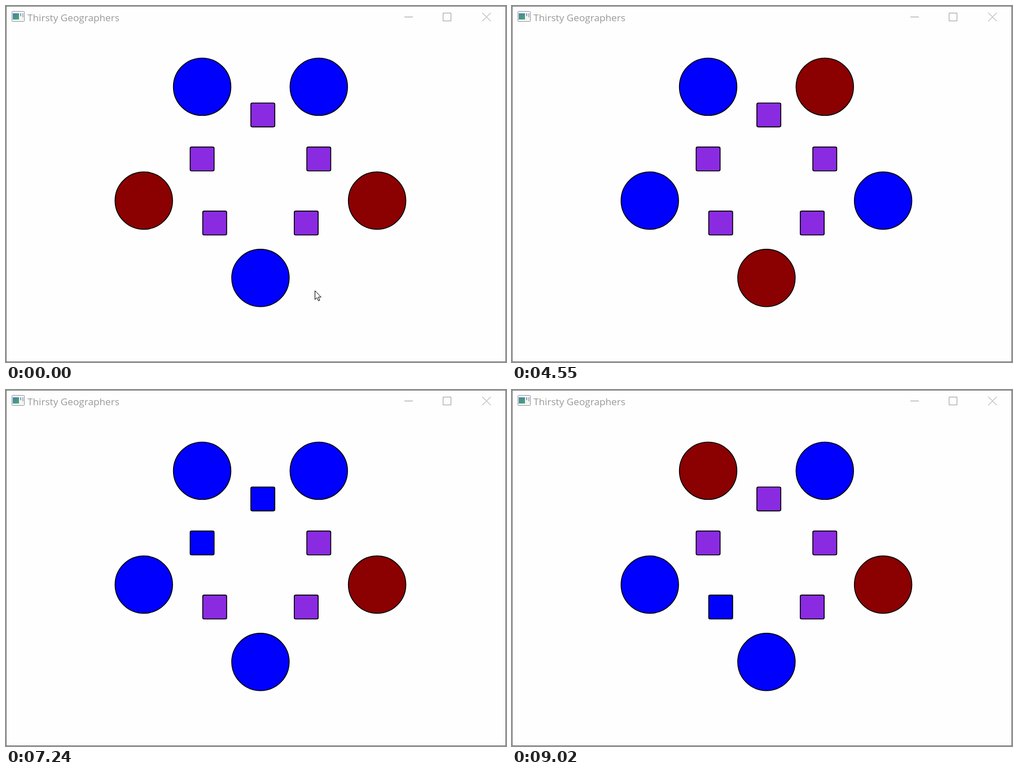
These frames come from a looping animation (886 px wide and 632 px high, 9.29 s). An HTML page:

```html
<!DOCTYPE html>
<html lang="en">
<head>
<meta charset="utf-8">
<title>Thirsty Geographers</title>
<style>
  html, body { margin: 0; width: 100%; height: 100%; overflow: hidden; background: #fefefe; }
  svg { display: block; }
  text { font: 17.2px "Open Sans", "Noto Sans", sans-serif; fill: #999; }
</style>
</head>
<body>
<svg width="886" height="632" viewBox="0 0 886 632">
  <rect x=".5" y=".5" width="885" height="631" fill="#fefefe" stroke="#6c6c6c"/>
  <!-- title bar -->
  <defs>
    <linearGradient id="pane" x2="1" y2="1">
      <stop stop-color="#4a7fa5"/>
      <stop offset="1" stop-color="#4aa577"/>
    </linearGradient>
  </defs>
  <rect x="10.5" y="9.5" width="22" height="18" rx="1" fill="#f4f4f4" stroke="#8d979f"/>
  <rect x="12" y="13" width="11" height="11" fill="url(#pane)"/>
  <path d="M25 13h2v5h-2zM29 13h1.5v7H29z" fill="#8fa3b5"/>
  <text x="38" y="26.5">Thirsty Geographers</text>
  <path d="M706 19.5h15M774.5 12.5h14v14h-14zM844 12l15 15M859 12l-15 15" fill="none" stroke="#999"/>
  <g id="table" stroke="#000" stroke-width="1.6"></g>
  <path id="cursor" d="M.5 .5V16L4 12.7 6.5 18.4 9 17.3 6.5 11.8H11.3Z" fill="#fff" stroke="#000"/>
</svg>
<script>
const LOOP = 9290, TICK = 10, SEATS = 5;
const MID = 450.9, CELL = 103.35, FORK = 42.4;
const table = document.getElementById("table");
const cursor = document.getElementById("cursor");

function add(tag, attrs) {
  const el = document.createElementNS("http://www.w3.org/2000/svg", tag);
  for (const key in attrs) el.setAttribute(key, attrs[key]);
  return table.appendChild(el);
}

// Seats and forks run clockwise from the top; the table is symmetric about MID.
const plates = [[-1, 143.4], [1, 143.4], [2, 345.5], [0, 482.8], [-2, 345.5]]
  .map(([col, cy]) => add("circle", { cx: MID + col * CELL, cy, r: 50.9 }));
const forks = [[4.2, 193.4], [CELL, 271.6], [81.1, 385.3], [-81.1, 385.3], [-CELL, 271.6]]
  .map(([dx, y]) => add("rect", {
    x: MID + dx - FORK / 2, y: y - FORK / 2, width: FORK, height: FORK, rx: 2.5
  }));

// Each diner's spans in ms: eat, think, eat, think ...; the last phase has no end.
const spans = [
  [2480, 1820, 310, 1250],
  [120, 1800, 570],
  [1920, 1500, 2850, 1220],
  [2880, 1400, 1090],
  [2070, 1500, 1980]
];

// A hungry diner takes the fork with its own number, then the one before it,
// eats, puts both back and thinks. Returns the table at every tick.
function dine() {
  const order = spans.map((_, k) => (4 + 3 * k) % SEATS);
  const diners = spans.map(list => ({ list: [...list], mood: "hungry", until: Infinity }));
  const owner = Array(SEATS).fill(null);
  const history = [];

  function enter(diner, mood, now) {
    diner.mood = mood;
    diner.until = mood === "hungry" ? Infinity : now + (diner.list.shift() ?? Infinity);
  }

  for (let now = 0; now < LOOP; now += TICK) {
    for (const diner of diners) {
      if (now < diner.until) continue;
      if (diner.mood === "eating") {
        owner.forEach((who, f) => { if (who === diner) owner[f] = null; });
        enter(diner, "thinking", now);
      } else {
        enter(diner, "hungry", now);
      }
    }
    for (const i of order) {
      const diner = diners[i], second = (i + SEATS - 1) % SEATS;
      if (diner.mood !== "hungry") continue;
      owner[i] ??= diner;
      if (owner[i] !== diner) continue;
      owner[second] ??= diner;
      if (owner[second] === diner) enter(diner, "eating", now);
    }
    history.push({
      eating: diners.map(d => d.mood === "eating"),
      held: owner.map(Boolean)
    });
  }
  return history;
}

// [start, x, y]; the pointer then leaves the window
const hops = [
  [0, 547, 505], [300, 314, 562], [450, 331, 531],
  [600, 356, 478], [720, 388, 414], [850, -50, -50]
];

function paint(shapes, flags, on) {
  shapes.forEach((shape, i) => shape.setAttribute("fill", flags[i] ? on : "#00f"));
}

const history = dine();

function draw(now) {
  const t = Math.max(0, now) % LOOP;
  const { eating, held } = history[Math.floor(t / TICK)];
  const [, x, y] = hops.findLast(hop => hop[0] <= t);
  paint(plates, eating, "#8b0000");
  paint(forks, held, "#8a2be2");
  cursor.setAttribute("transform", `translate(${x} ${y})`);
  requestAnimationFrame(draw);
}
draw(0);
</script>
</body>
</html>
```
